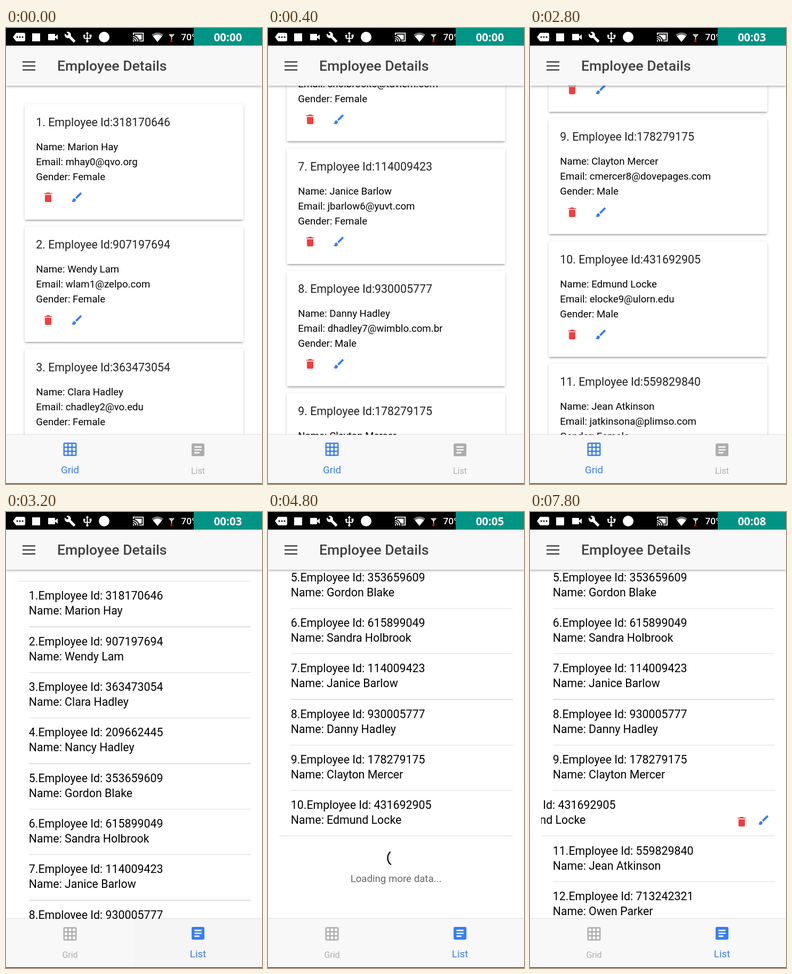
An HTML page that plays this animation: 480 by 854 pixels, repeating every 8000 ms.

```html
<!DOCTYPE html>
<html lang="en">
<head>
<meta charset="utf-8">
<title>Employee Details</title>
<style>
html, body { margin: 0; width: 100%; height: 100%; overflow: hidden; background: #fff; }
#stage { position: relative; width: 480px; height: 854px; overflow: hidden; background: #fff; font-family: Roboto, sans-serif; color: #000; }
#stage div, #stage svg { position: absolute; }
.t { line-height: 0; white-space: pre; }
.mid { transform: translateX(-50%); }
.card { left: 35px; width: 410px; height: 216px; border-radius: 2.7px; background: #fff;
  box-shadow: 0 2.7px 2.7px rgba(0,0,0,.14), 0 4px 1.3px -2.7px rgba(0,0,0,.2), 0 1.3px 6.7px rgba(0,0,0,.12); }
.row { left: 21px; width: 438px; height: 85.33px; overflow: hidden; }
.line { left: 22px; right: 0; bottom: 0; height: 1.33px; background: #dedede; }
.wide .line { left: 0; }
.opts { display: none; }
.slid .in { left: -146px; }
.slid .opts { display: block; }
.red { fill: #f53d3d; }
.blue { fill: #387ef5; }
#head { top: 33px; width: 480px; height: 75px; background: #f8f8f8; box-shadow: 0 1.5px 4px rgba(0,0,0,.3); }
#tabs { top: 762px; width: 480px; height: 92px; background: #f8f8f8; box-shadow: 0 -1px 2px rgba(0,0,0,.14); }
.tab { width: 240px; height: 91px; color: #aeaeae; fill: #aeaeae; }
.tab svg { top: 0; left: 0; }
.tab .t { left: 120px; top: 67.5px; font-size: 16px; }
.tab.on { color: #387ef5; fill: #387ef5; }
.tab.on svg { top: -1px; }
.tab.on .t { top: 66px; font-size: 18.67px; }
#clock { left: 352px; width: 128px; height: 33px; background: #009485; color: #fff;
  font: bold 20.5px/34px "Noto Sans", "Open Sans", sans-serif; text-align: center; }
</style>
</head>
<body>
<div id="stage">
  <div id="cards"></div>
  <div id="list"><div style="left:21px;top:129px;width:438px;height:1.33px;background:#dedede"></div></div>
  <div id="loading">
    <svg width="480" height="700"><circle id="arc" cx="240" cy="648" r="15.6" fill="none" stroke="#000" stroke-width="2.4" stroke-dasharray="27.6 100"/></svg>
    <div class="t mid" style="left:240px;top:687px;font-size:18.67px;color:#666">Loading more data...</div>
  </div>
  <div id="head">
    <svg width="60" height="75"><path d="M31 30.5h24M31 38h24M31 45.5h24" stroke="#424242" stroke-width="2.6"/></svg>
    <div class="t" style="left:96px;top:38px;font-size:26.67px;font-weight:500;color:#424242">Employee Details</div>
  </div>
  <div id="tabs">
    <div class="tab" id="gridTab">
      <svg width="240" height="60"><path transform="translate(105 13) scale(1.25)" fill-rule="evenodd" d="M20 2H4a2 2 0 0 0-2 2v16a2 2 0 0 0 2 2h16a2 2 0 0 0 2-2V4a2 2 0 0 0-2-2zM4 4h4v4H4zm6 0h4v4h-4zm6 0h4v4h-4zM4 10h4v4H4zm6 0h4v4h-4zm6 0h4v4h-4zM4 16h4v4H4zm6 0h4v4h-4zm6 0h4v4h-4z"/></svg>
      <div class="t mid">Grid</div>
    </div>
    <div class="tab" id="listTab" style="left:240px">
      <svg width="240" height="60"><path transform="translate(104 12) scale(1.333)" fill-rule="evenodd" d="M19 3H5a2 2 0 0 0-2 2v14a2 2 0 0 0 2 2h14a2 2 0 0 0 2-2V5a2 2 0 0 0-2-2zM7 7h10v2H7zm0 4h10v2H7zm0 4h7v2H7z"/></svg>
      <div class="t mid">List</div>
    </div>
    <div style="top:91px;width:480px;height:1px;background:#000"></div>
  </div>
  <div style="width:480px;height:33px;background:#000">
    <svg width="352" height="33" fill="#fff">
      <path d="M13 17l6-8h14q3 0 3 3v10q0 3-3 3H19z"/>
      <path d="M21 17h.1M26 17h.1M31 17h.1" stroke="#000" stroke-width="3" stroke-linecap="round"/>
      <path d="M49 10h15v15H49z"/>
      <path d="M80 11h11q1 0 1 1v4l5-4v10l-5-4v4q0 1-1 1H80q-1 0-1-1V12q0-1 1-1z"/>
      <path transform="translate(109 6) scale(.92)" d="M22.7 19l-9.1-9.1c.9-2.3.4-5-1.5-6.9-2-2-5-2.4-7.4-1.3L9 6 6 9 1.6 4.7C.4 7.1.9 10.1 2.9 12.1c1.9 1.9 4.6 2.4 6.9 1.5l9.1 9.1c.4.4 1 .4 1.4 0l2.3-2.3c.5-.4.5-1.1.1-1.4z"/>
      <path d="M152.4 10v14M146.600 15v3q0 1.500 2 1.500h8q2 0 2-1.500v-4" fill="none" stroke="#fff" stroke-width="2"/>
      <path d="M152.400 7l3 4h-6zM156.500 12.500h4v4h-4z"/>
      <circle cx="146.800" cy="14.500" r="2.100"/><circle cx="152.400" cy="25" r="2.200"/>
      <circle cx="184" cy="17" r="10"/>
      <g transform="translate(237 6) scale(.92)">
        <path d="M2 8V4h20v16h-8M1 15c3.300 0 6 2.700 6 6M1 11c5.500 0 10 4.500 10 10" fill="none" stroke="#fff" stroke-width="2"/>
        <path d="M1 18v3h3c0-1.660-1.340-3-3-3zM19 7H5v1.630c3.960 1.280 7.090 4.410 8.370 8.370H19z"/>
      </g>
      <path d="M284 26L273 12.500q11-8 22 0z" fill="#777"/>
      <path d="M284 26L275.500 15.500q8.500-6 17 0z"/>
      <path d="M306.500 12.500h8l-4 4.500zM310.500 13v9" fill="none" stroke="#fff" stroke-width="1.400"/>
      <path d="M308 22.500l4 4m0-4l-4 4" stroke="#d22" stroke-width="1.200"/>
    </svg>
    <div class="t" style="left:328.500px;top:17px;font-size:17.300px;font-weight:500;color:#fff">70%</div>
    <div id="clock"></div>
  </div>
</div>
<script>
const $ = id => document.getElementById(id);
const people = `318170646|Marion Hay|mhay0@qvo.org|F
907197694|Wendy Lam|wlam1@zelpo.com|F
363473054|Clara Hadley|chadley2@vo.edu|F
209662445|Nancy Hadley|nhadley3@orvane.com|F
353659609|Gordon Blake|gblake4@tilmo.org|M
615899049|Sandra Holbrook|sholbrook5@tavlem.com|F
114009423|Janice Barlow|jbarlow6@yuvt.com|F
930005777|Danny Hadley|dhadley7@wimblo.com.br|M
178279175|Clayton Mercer|cmercer8@dovepages.com|M
431692905|Edmund Locke|elocke9@ulorn.edu|M
559829840|Jean Atkinson|jatkinsona@plimso.com|F
713242321|Owen Parker|oparkerb@quillot.com|M`.split('\n').map(p => p.split('|'));

const TRASH = 'M6 19a2 2 0 0 0 2 2h8a2 2 0 0 0 2-2V7.5H6zM19.5 4.5h-3.750L14.500 3h-5L8.250 4.500H4.500V6h15z';
const BRUSH = 'M7 14c-1.660 0-3 1.340-3 3 0 1.310-1.160 2-2 2 .92 1.220 2.490 2 4 2 2.210 0 4-1.790 4-4 0-1.660-1.340-3-3-3zm13.710-9.370l-1.340-1.340c-.39-.39-1.020-.39-1.410 0L9 12.250 11.750 15l8.960-8.960c.39-.39.39-1.020 0-1.410z';

const text = (x, y, size, s, color = '#000') =>
  `<div class="t" style="left:${x}px;top:${y}px;font-size:${size}px;color:${color}">${s}</div>`;
const icon = (x, y, cls, d) =>
  `<svg class="${cls}" style="left:${x}px;top:${y}px" width="24" height="24"><path d="${d}"/></svg>`;

people.forEach(([id, name, mail, sex], i) => {
  const n = i + 1;
  $('cards').innerHTML += `<div class="card" style="top:${142.67 + 229.33 * i}px">` +
    text(21.3, 34.2, 21.33, `${n}. Employee Id:${id}`, '#222') +
    text(21.3, 80.2, 18.67, `Name: ${name}`) +
    text(21.3, 108.2, 18.67, `Email: ${mail}`) +
    text(21.3, 136.2, 18.67, `Gender: ${sex === 'F' ? 'Female' : 'Male'}`) +
    icon(31.5, 162.5, 'red', TRASH) + icon(86.3, 162.5, 'blue', BRUSH) + '</div>';
  $('list').innerHTML += `<div class="row" style="top:${130.2 + 85.33 * i}px"><div class="in">` +
    text(21.8, 27, 21.33, `${n}.Employee Id: ${id}`) +
    text(21.8, 55, 21.33, `Name: ${name}`) + '</div><div class="opts">' +
    icon(363.5, 45.5, 'red', TRASH) + icon(404.5, 42.5, 'blue', BRUSH) +
    '</div><div class="line"></div></div>';
});

const cards = [...document.querySelectorAll('.card')];
const rows = [...document.querySelectorAll('.row')];
const ticks = [600, 1800, 2800, 3800, 4600, 5800, 6800, 7800];
const fling = [0, 620, 1293, 1807];
const STEP = 200;
// Spinner start angles, one per step, for each of the two waits
const spins = { 600: [59, 155, 251, 347, 423], 4000: [88, 186, 310, 408, 486] };
const show = (el, on) => el.style.display = on ? '' : 'none';

function draw(t) {
  t = Math.floor(t / STEP) * STEP;
  const listMode = t >= 3200;
  const waitStart = listMode ? 4000 : 600;
  const angle = spins[waitStart][(t - waitStart) / STEP];
  const loading = angle !== undefined;
  const loaded = t >= (listMode ? 5000 : 1600);

  show($('cards'), !listMode);
  show($('list'), listMode);
  $('cards').style.top = -fling[Math.min(3, t / STEP)] + 'px';
  $('list').style.top = (t >= 4000 ? -376 : 0) + 'px';
  [...cards.slice(10), ...rows.slice(10)].forEach(el => show(el, loaded));

  const slid = t >= 7800;
  rows[9].classList.toggle('slid', slid);
  rows[9].classList.toggle('wide', slid || !loaded);

  show($('loading'), loading);
  if (loading) $('arc').setAttribute('transform', `rotate(${angle} 240 648)`);

  $('gridTab').classList.toggle('on', !listMode);
  $('listTab').classList.toggle('on', listMode);
  $('listTab').style.background = t === 3200 ? '#f5f5f5' : '';
  $('clock').textContent = '00:0' + ticks.filter(s => t >= s).length;
}

const start = performance.now();
function frame() {
  draw((performance.now() - start) % 8000);
  requestAnimationFrame(frame);
}
frame();
</script>
</body>
</html>
```
